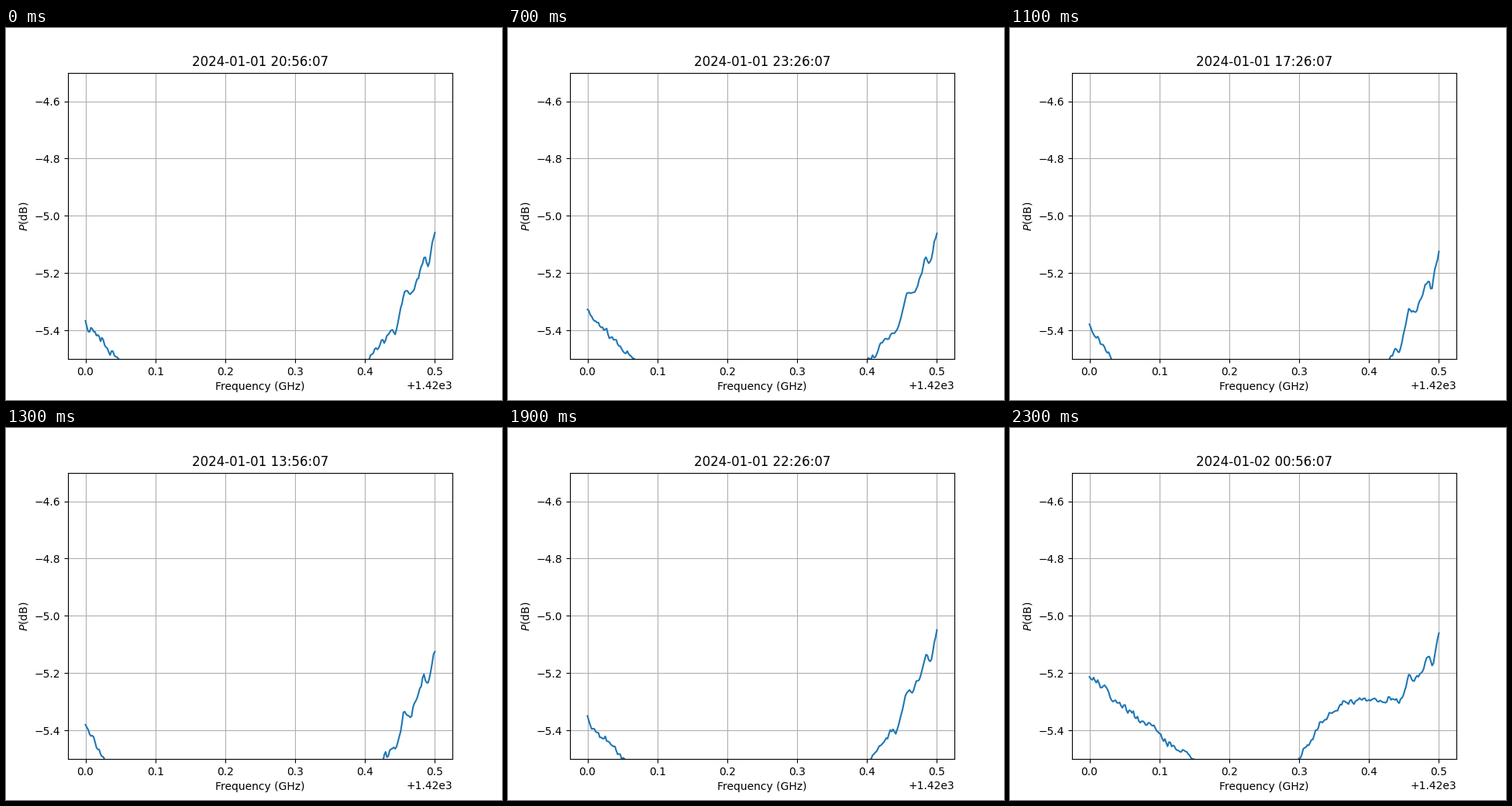
Recreate the animation shown at these times as a matplotlib script. Size 640 px wide and 480 px high, loop 2.4 s.

```python
import numpy as np
import matplotlib.pyplot as plt
from matplotlib.animation import FuncAnimation

START = np.datetime64("2024-01-01T13:56:07")
STEP = np.timedelta64(30, "m")

# Half-hour slots in playback order (the recordings are not sorted by time).
ORDER = [14, 15, 16, 13, 12, 18, 19, 20, 5, 6, 7, 8,
         0, 10, 9, 11, 1, 2, 17, 3, 4, 21, 22]

# Drift of the power at both ends of the band.
SLOTS = [7, 9, 14, 16, 19, 22]
LOW_END = [-5.38, -5.32, -5.365, -5.37, -5.33, -5.2]
HIGH_END = [-5.125, -5.145, -5.063, -5.05, -5.06, -5.085]

f = np.linspace(0, 0.5, 256)


def bump(centre, width, height):
    return height * np.exp(-0.5 * ((f - centre) / width) ** 2)


# Receiver ripple, the same in every spectrum.
RIPPLE = (bump(0.443, 0.003, -0.03) + bump(0.457, 0.004, 0.043)
          + bump(0.484, 0.003, 0.02) + bump(0.491, 0.003, -0.045))


def power(slot):
    fall = 0.165 - 0.003 * (slot - 7)
    low = np.interp(slot, SLOTS, LOW_END) - fall * (f / 0.05) ** 0.85

    # The hydrogen hump only rises in the last slots.
    rise = np.clip((slot - 19) / 3, 0, 1)
    high = np.interp(slot, SLOTS, HIGH_END) - 0.692 * (1 - np.exp((f - 0.5) / 0.0943))
    high += RIPPLE + bump(0.358, 0.061, 0.31 * rise)

    noise = np.random.default_rng(slot).normal(0, 0.01, f.size + 1)
    return np.maximum(low, high) + (noise[1:] + noise[:-1]) / 2


fig, ax = plt.subplots(figsize=(6.4, 4.8), dpi=100)
line, = ax.plot(1420 + f, power(ORDER[0]))
ax.set_ylim(-5.5, -4.5)
ax.set_xlabel("Frequency (GHz)")
ax.set_ylabel("$P$(dB)")
ax.grid()
title = ax.set_title("")


def update(i):
    slot = ORDER[max(i - 1, 0)]  # the first spectrum is held twice as long
    line.set_ydata(power(slot))
    title.set_text(str(START + slot * STEP).replace("T", " "))
    return line, title


anim = FuncAnimation(fig, update, frames=len(ORDER) + 1, interval=100,
                     repeat=True, repeat_delay=0)
plt.show()
```
